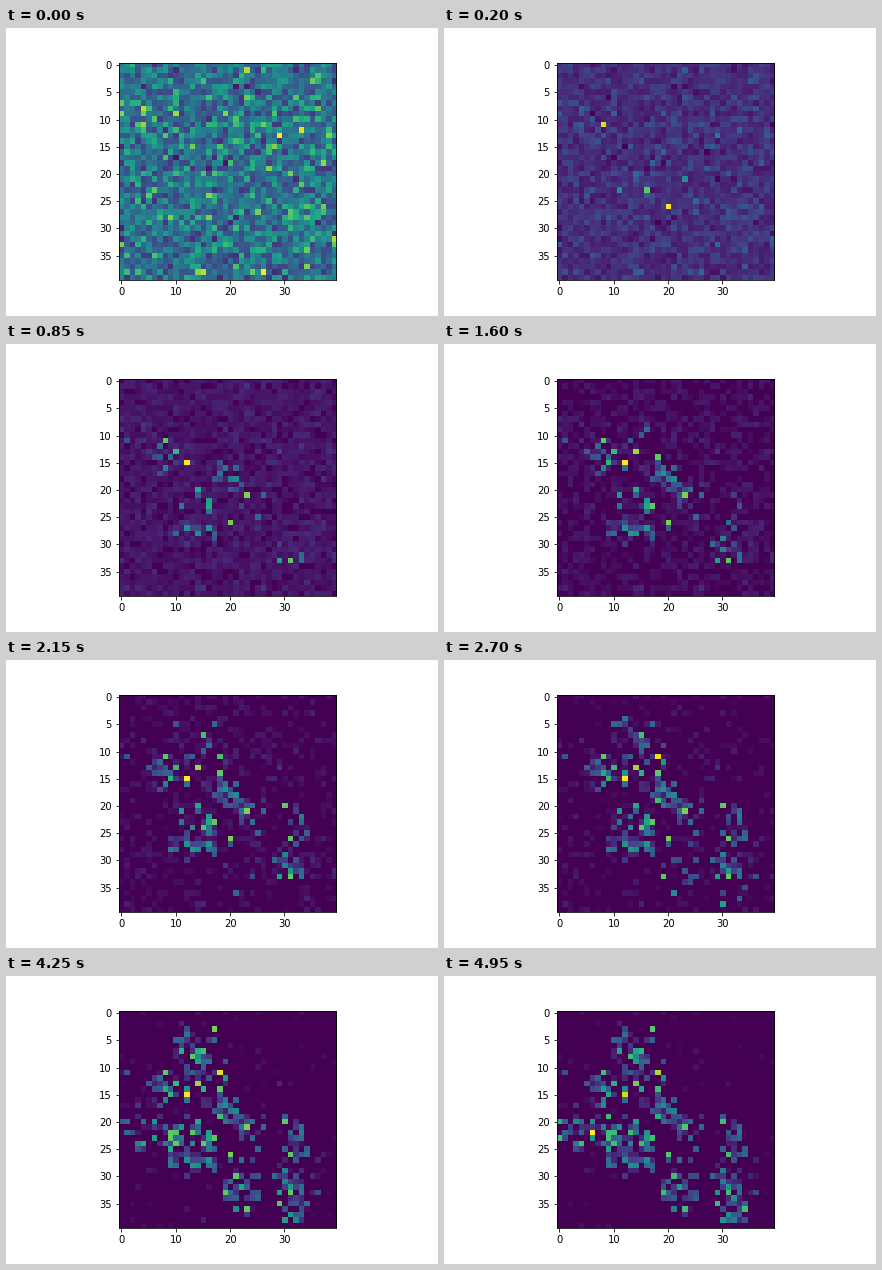
Animation of 432 by 288 pixels, one loop 5000 ms. Source, as a matplotlib script:

```python
import numpy as np
import matplotlib.pyplot as plt
from matplotlib.animation import FuncAnimation

SIZE = 40
FRAMES = 100
STEP = 0.05  # seconds per frame
END = FRAMES * STEP
CELLS_PER_HUB = 31

# places around which cells light up: column, row, first birth
HUBS = [(18, 18, 0), (22, 20, 0), (12, 26, 0), (15, 26, .2), (8, 14, 0),
        (31, 31, .1), (16, 9, .8), (32, 24, 1), (22, 32, 1.8),
        (13, 6, 1.9), (32, 36, 2.4), (10, 23, 2.6), (4, 21, 3.5)]

# strongest cells: column, row, birth, level
PEAKS = [(20, 26, 0, .8), (16, 23, 0, .6), (8, 11, 0, .75),
         (23, 21, .1, .8), (12, 15, .4, 1), (31, 33, .5, .75),
         (14, 13, 1.1, .85), (18, 11, 2, .95), (17, 3, 3, .8),
         (6, 22, 4.4, 1.08)]

rng = np.random.default_rng(12)
noise = rng.gamma(9, .05, (SIZE, SIZE)) - .06
rank = rng.random((SIZE, SIZE))
level = np.zeros((SIZE, SIZE))
birth = np.zeros((SIZE, SIZE))


def plant(col, row, time, value):
    if 0 <= col < SIZE and 0 <= row < SIZE and value > level[row, col]:
        level[row, col] = value
        birth[row, col] = time


for x, y, start in HUBS:
    span = min(2.4, END - start)
    for _ in range(CELLS_PER_HUB):
        col, row = np.rint(rng.normal((x, y), 2)).astype(int)
        time = start + span * rng.random() ** 1.5
        plant(col, row, time, min(.08 + rng.exponential(.22), .75))

for peak in PEAKS:
    plant(*peak)


def grid(frame):
    t = frame * STEP
    gain = .08 + .92 / (1 + 12 * t)
    alive = 1 / (1 + (t / 1.6) ** 3)
    back = noise * gain * (rank < alive)
    hot = level * np.clip((t - birth) / .2, 0, 1)
    # colours always span up to the strongest cell
    return np.maximum(back, hot / max(hot.max(), .01))


plt.rcParams["font.family"] = "DejaVu Sans"
fig, ax = plt.subplots(figsize=(6, 4), dpi=72, facecolor="white")
fig.subplots_adjust(left=.125, right=.9, bottom=.125, top=.88)
image = ax.imshow(grid(0), cmap="viridis", vmin=0, vmax=1,
                  interpolation="nearest")
ax.set_xticks(range(0, SIZE, 10))
ax.set_yticks(range(0, SIZE, 5))
ax.tick_params(labelsize=10)


def update(frame):
    image.set_data(grid(frame))
    return [image]


anim = FuncAnimation(fig, update, frames=FRAMES, interval=50,
                     repeat=True, repeat_delay=0)
plt.show()
```
